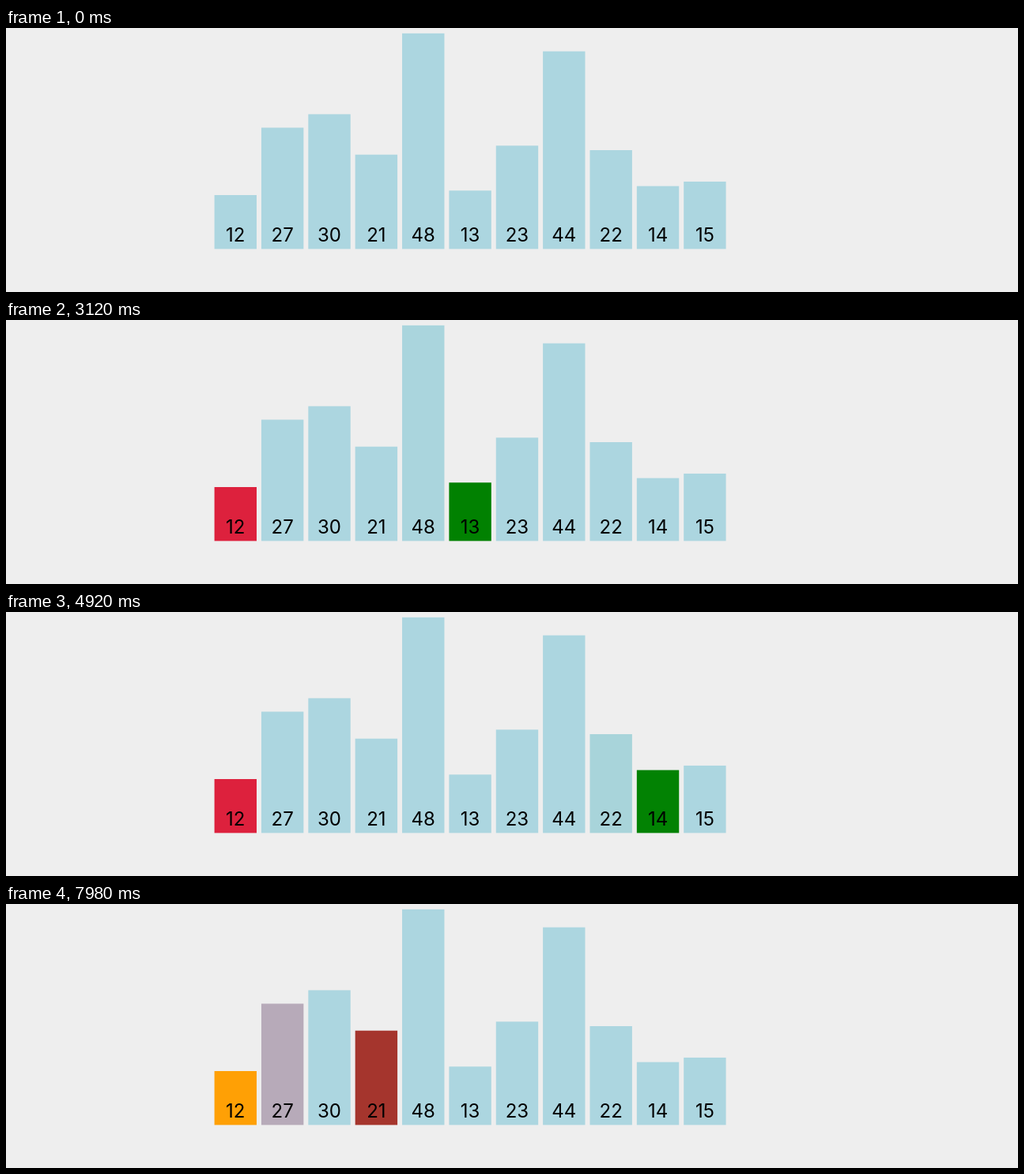
An HTML page that plays this animation: 1280x335 px, repeating every 8000 ms.

```html
<!DOCTYPE html>
<html lang="en">
<head>
<meta charset="utf-8">
<title>Selection sort</title>
<style>
  html, body { margin: 0; width: 100%; height: 100%; overflow: hidden; background: #eee; }
  svg { display: block; width: 1280px; height: 335px; }
  text { font: 24px Inter, sans-serif; text-anchor: middle; }
</style>
</head>
<body>
<svg id="chart" viewBox="0 0 1280 335"></svg>
<script>
const LOOP = 8000, STEP = 60, FADE = 260, GAMMA = 1.15;
const values = [12, 27, 30, 21, 48, 13, 23, 44, 22, 14, 15];
const colors = {
  idle: [172, 214, 224],
  scan: [0, 128, 0],
  min: [221, 33, 61],
  done: [255, 160, 5]
};

// Each entry: start time, then the bars that take on a new state.
const events = [
  [675, { 0: 'min' }],
  [1110, { 1: 'scan' }],
  [1590, { 1: 'idle', 2: 'scan' }],
  [2010, { 2: 'idle', 3: 'scan' }],
  [2490, { 3: 'idle', 4: 'scan' }],
  [2895, { 4: 'idle', 5: 'scan' }],
  [3390, { 5: 'idle', 6: 'scan' }],
  [3795, { 6: 'idle', 7: 'scan' }],
  [4285, { 7: 'idle', 8: 'scan' }],
  [4710, { 8: 'idle', 9: 'scan' }],
  [5130, { 9: 'idle', 10: 'scan' }],
  [5595, { 10: 'idle' }],
  [6075, { 0: 'done' }],
  [6495, { 1: 'min' }],
  [7003, { 2: 'scan' }],
  [7410, { 2: 'idle', 3: 'scan' }],
  [7857, { 1: 'idle', 3: 'min' }]
];

const chart = document.getElementById('chart');

function add(name, attributes) {
  const node = document.createElementNS('http://www.w3.org/2000/svg', name);
  for (const key in attributes) node.setAttribute(key, attributes[key]);
  return chart.appendChild(node);
}

const bars = values.map((value, i) => {
  const x = 263.6 + i * 59.36, width = 53.4, height = value * 5.7;
  const bar = add('rect', { x, y: 280.4 - height, width, height });
  add('text', { x: x + width / 2, y: 271 }).textContent = value;
  return bar;
});

// The CSS "ease" curve: cubic-bezier(.25, .1, .25, 1).
function ease(x) {
  if (x <= 0) return 0;
  if (x >= 1) return 1;
  const bezier = (a, b, u) => 3 * a * u * (1 - u) ** 2 + 3 * b * u * u * (1 - u) + u ** 3;
  let low = 0, high = 1;
  for (let i = 0; i < 20; i++) {
    const mid = (low + high) / 2;
    if (bezier(.25, .25, mid) < x) low = mid; else high = mid;
  }
  return bezier(.1, 1, low);
}

function mix(from, to, p) {
  return from.map((c, i) =>
    ((1 - p) * c ** (1 / GAMMA) + p * to[i] ** (1 / GAMMA)) ** GAMMA);
}

function colorAt(bar, time) {
  let color = colors.idle;
  for (const [start, changes] of events) {
    if (time > start && changes[bar]) {
      color = mix(color, colors[changes[bar]], ease((time - start) / FADE));
    }
  }
  return `rgb(${color.map(Math.round)})`;
}

function draw(now) {
  const time = Math.floor(now % LOOP / STEP) * STEP;
  bars.forEach((bar, i) => bar.setAttribute('fill', colorAt(i, time)));
}

function tick(now) {
  draw(now);
  requestAnimationFrame(tick);
}

draw(0);
requestAnimationFrame(tick);
</script>
</body>
</html>
```
